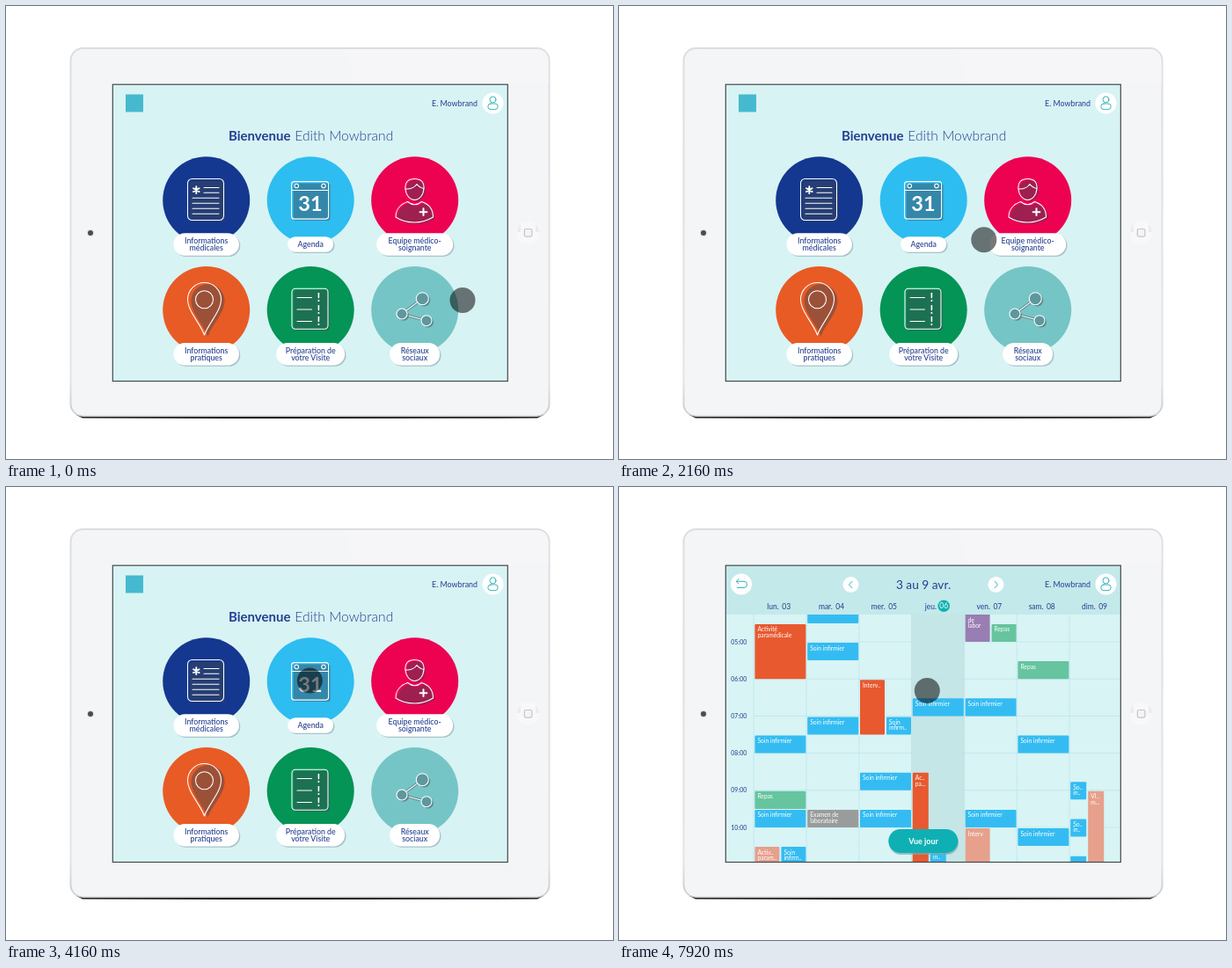
An HTML page for the animation above (8000 ms loop, 690 by 515 pixels).

```html
<!DOCTYPE html>
<html lang="fr">
<head>
<meta charset="utf-8">
<title>Tablette</title>
<style>
html, body { margin: 0; width: 100%; height: 100%; overflow: hidden; background: #fff }
svg { display: block; width: 690px; height: 515px; font-family: Lato, "Open Sans", sans-serif }
text { white-space: pre }
.navy { fill: #233f90 }
.mid { text-anchor: middle }
.line { fill: none; stroke: #fff; stroke-width: 1.05; stroke-linecap: round; stroke-linejoin: round }
.shade { fill: #3c4650; opacity: .45 }
.teal { fill: none; stroke: #35b5b9; stroke-width: 1; stroke-linecap: round; stroke-linejoin: round }
</style>
</head>
<body>
<svg viewBox="0 0 690 515">
  <defs>
    <clipPath id="screen"><rect x="121" y="89" width="450" height="338"/></clipPath>
    <clipPath id="grid"><rect x="121" y="145" width="450" height="281"/></clipPath>
    <linearGradient id="edge" x2="0" y2="1">
      <stop offset="0" stop-color="#dcdde0"/><stop offset=".9" stop-color="#e3e4e6"/><stop offset="1" stop-color="#c9cacd"/>
    </linearGradient>
  </defs>
  <path d="M80 465H611L604 468.6Q345 469.4 87 468.6Z" fill="#222224"/>
  <rect x="72.5" y="47" width="546" height="420" rx="15" fill="url(#edge)"/>
  <rect x="74.5" y="49" width="542" height="416.5" rx="13" fill="#f4f5f7"/>
  <path d="M383 49H604a12.5 12.5 0 0 1 12.5 12.5V89H398Z" fill="#f6f6f8"/>
  <circle cx="96" cy="258" r="4.2" fill="#e4e4e6"/>
  <circle cx="96" cy="258" r="3" fill="#4c4c50"/>
  <circle cx="593.5" cy="257.5" r="13" fill="#f8f8fa"/>
  <path d="M581 257a12.5 12.5 0 0 1 4-9v9ZM606 257a12.5 12.5 0 0 0-4-9v9Z" fill="#ececee"/>
  <rect x="589.3" y="253.5" width="8.6" height="8.6" rx="1.8" fill="#f4f4f5" stroke="#c3c4c7" stroke-width="1.2"/>
  <g clip-path="url(#screen)">
    <g id="home"></g>
    <g id="agenda"></g>
    <g id="user"></g>
  </g>
  <rect x="121.3" y="89.2" width="449" height="337.3" fill="none" stroke="#434a4c" stroke-width="1.2"/>
  <circle id="touch" r="14.5" fill-opacity=".53"/>
</svg>
<script>
const $ = id => document.getElementById(id);
const rect = (x, y, w, h, r, attrs) => `<rect x="${x}" y="${y}" width="${w}" height="${h}" rx="${r}" ${attrs}/>`;
const disc = (x, y, r, attrs) => `<circle cx="${x}" cy="${y}" r="${r}" ${attrs}/>`;
const path = (d, attrs = 'class="line"') => `<path d="${d}" ${attrs}/>`;
const text = (x, y, size, s, attrs = 'class="navy"') => `<text x="${x}" y="${y}" font-size="${size}" ${attrs}>${s}</text>`;
const white = 'fill="#fff"', line = 'class="line"', shade = 'class="shade"';

// An outlined shape with its fill shifted right and down
const raised = (make, dx = 2) => `<g transform="translate(${dx} 1.8)">${make(shade)}</g>` + make(line);

const person = 'M456.5 222.5Q464.5 229 472.5 222.5C480 225 485.5 231 485.5 240C479 244 472 246 464.5 246S449 244 443 240C443 231 449 225 456.5 222.5Z' +
  'M454 207.5C453.5 200 457.5 196.5 464.5 196.5S475.5 200 475 207.5C474.5 215.5 469.5 220.5 464.5 220.5S454.5 215.5 454 207.5Z';
const pin = 'M225.5 374C221 361 206.5 347 206.5 333.5a19 19 0 0 1 38 0C244.5 347 230 361 225.5 374Z';
const nodes = [[473.3, 332.7, 7], [450, 350, 6], [478, 357.7, 6]];
const links = 'M450 350L473.3 332.7M450 350L478 357.7';

const icons = [
  raised(c => rect(206.5, 196.5, 41, 47, 5, c)) +
    path('M225 206.5H242M225 212.3H242M212 218.3H242M212 224.3H242M212 230.3H242M212 236.3H242') +
    path('M216.3 205.3V213M213 207.2L219.6 211.1M219.6 207.2L213 211.1', 'class="line" style="stroke-width:1.9"'),
  raised(c => rect(324.6, 199.6, 42, 42.5, 3, c)) + path('M324.6 209.5H366.6') +
    disc(330.3, 204.5, 2.3, line) + disc(361, 204.5, 2.3, line) +
    text(346, 233.3, 23.5, '31', 'class="mid" font-weight="700" fill="#fff"'),
  raised(c => path(person, c)) + path('M454 208Q463 208.5 467 202.5Q470 206.5 475 207.5') +
    path('M474.5 230.3V238.1M470.6 234.2H478.4', 'class="line" style="stroke-width:2"'),
  raised(c => path(pin, c), 4) + disc(225.5, 333.7, 10, line),
  raised(c => rect(325, 321.3, 41, 46, 4, c)) + path('M331 331.5H347.5M331 345H347.5M331 358.5H347.5') +
    [336, 349.6, 363.1].map(y => text(355.5, y, 13.5, '!', 'class="mid" font-weight="700" fill="#fff"')).join(''),
  path(links, 'class="shade" style="stroke:#3c4650;stroke-width:3"') + path(links) +
    nodes.map(([x, y, r]) => disc(x + 2, y + 1.8, r, shade) + disc(x, y, r, 'class="line" style="fill:#5f979e"')).join('')
];

// colour, pill width, label lines
const tiles = [
  ['#14388f', 74.5, 'Informations', 'médicales'],
  ['#2dbdf1', 52, 'Agenda'],
  ['#ec0251', 87, 'Equipe médico-', 'soignante'],
  ['#e85b25', 74.5, 'Informations', 'pratiques'],
  ['#049455', 78, 'Préparation de', 'votre Visite'],
  ['#76c5c6', 57, 'Réseaux', 'sociaux']
];

function tile([color, w, ...lines], i) {
  const x = 227.7 + i % 3 * 118.5, y = i < 3 ? 220.8 : 345.6;
  const h = lines.length > 1 ? 25.5 : 17.5, cy = y + 50.2;
  const pill = (d, fill) => rect(x - w / 2 + d, cy - h / 2 + d, w, h, h / 2, `fill="${fill}"`);
  const first = cy + 3 - (lines.length - 1) * 4.2;
  return disc(x, y, 49.5, `fill="${color}"`) + icons[i] + pill(1.3, '#a9c3c8') + pill(0, '#fff') +
    lines.map((s, k) => text(x, first + k * 8.4, 8.8, s, 'class="navy mid" font-weight="500"')).join('');
}

$('home').innerHTML = rect(121, 89, 450, 338, 0, 'fill="#d8f3f4"') +
  rect(136, 100.5, 20, 20, 0, 'fill="#45b9cf"') +
  text(253, 153, 15, 'Bienvenue', 'class="navy" font-weight="700"') +
  text(328.3, 153, 15.6, 'Edith Mowbrand', 'class="navy" font-weight="300"') + tiles.map(tile).join('');

$('user').innerHTML = text(536, 114, 8.9, 'E. Mowbrand', 'class="navy" text-anchor="end"') +
  disc(553.5, 110.5, 12, white) + disc(553.5, 106.4, 3.5, 'class="teal"') +
  rect(547.8, 111, 11.4, 6.6, 3.3, 'class="teal"');

const blue = '#34bcf2', orange = '#e8592f', green = '#66c49e', salmon = '#e6a08c', care = ['Soin infirmier'];
const colX = i => 153.2 + i * 59.8, hourY = h => 176 + (h - 5) * 42.2;

// day, offset in the column, width, start hour, end hour, colour, lines
const events = [
  [0, 0, 58, 4.5, 6, orange, 'Activité', 'paramédicale'],
  [0, 0, 58, 9, 9.5, green, 'Repas'],
  [0, 0, 28, 10.5, 11.5, salmon, 'Activ..', 'param..'],
  [0, 30, 28, 10.5, 11.5, blue, 'Soin', 'infirm..'],
  [1, 0, 58, 9.5, 10, '#9a9c9c', 'Examen de', 'laboratoire'],
  [2, 0, 28, 6, 7.5, orange, 'Interv..'],
  [2, 30, 28, 7, 7.5, blue, 'Soin', 'infirm..'],
  [3, 0, 18, 8.5, 11.5, orange, 'Ac..', 'pa...'],
  [3, 20, 18, 10.62, 11.5, blue, 'in..'],
  [4, 0, 28, 4.1, 5, '#987eb3', '', 'de', 'labor'],
  [4, 30, 28, 4.5, 5, green, 'Repas'],
  [4, 0, 28, 10, 11.5, salmon, 'Interv'],
  [5, 0, 58, 5.5, 6, green, 'Repas'],
  [6, 0, 18, 8.75, 9.25, blue, 'So..', 'in..'],
  [6, 0, 18, 9.75, 10.25, blue, 'So..', 'in..'],
  [6, 0, 18, 10.75, 11.5, blue],
  [6, 20, 18, 9, 11.5, salmon, 'VI..', 'm...'],
  [1, 0, 58, 4, 4.5, blue]
];
[[0, 7.5], [0, 9.5], [1, 5], [1, 7], [2, 8.5], [2, 9.5], [3, 6.5], [4, 6.5], [4, 9.5], [5, 7.5], [5, 10]]
  .forEach(([day, h]) => events.push([day, 0, 58, h, h + .5, blue, ...care]));

function event([day, dx, w, from, to, color, ...lines]) {
  const x = colX(day) + 1.2 + dx, y = hourY(from) + 1;
  return rect(x, y, w, hourY(to) - y, 1, `fill="${color}"`) +
    lines.map((s, k) => text(x + 3, y + 8.5 + k * 6.4, 6.7, s, white)).join('');
}

let grid = rect(121, 145, 450, 282, 0, 'fill="#d8f4f5"') + rect(colX(3), 145, 59.8, 282, 0, 'fill="#c5e6e6"');
for (let h = 5; h < 11; h++)
  grid += path(`M153 ${hourY(h)}H571`, 'stroke="#bfe5ea" stroke-width=".8"') + text(127.3, hourY(h) + 2.6, 7, `0${h}:00`.slice(-5));
for (let i = 0; i < 7; i++)
  grid += path(`M${colX(i)} 145V427`, 'stroke="#a5d9e2" stroke-width=".8" stroke-dasharray="1 1"');

const names = ['lun. 03', 'mar. 04', 'mer. 05', 'jeu.', 'ven. 07', 'sam. 08', 'dim. 09'];
const days = names.map((s, i) =>
  text(i == 3 ? 354.3 : 181.7 + i * 59.8, 138.6, 8.5, s, 'class="navy mid" word-spacing="1.2"')).join('');

$('agenda').innerHTML = `<g clip-path="url(#grid)">${grid + events.map(event).join('')}</g>` +
  rect(121, 89, 450, 56, 0, 'fill="#c4e9ea"') + days +
  disc(369.2, 135.3, 6.8, 'fill="#10b0b0"') + text(369.2, 138.4, 8.5, '06', 'class="mid" fill="#fff"') +
  text(346, 115.8, 13.7, '3 au 9 avr.', 'class="navy mid"') +
  disc(139, 110.5, 12, white) + disc(263.5, 111, 9, white) + disc(428.5, 111, 9, white) +
  path('M136 104.5L133.5 107.3L136 110M133.5 107.3H142a3.6 3.6 0 0 1 0 7.2H134.5', 'class="teal"') +
  path('M265 107.2L261.5 111L265 114.8M427 107.2L430.5 111L427 114.8', 'class="teal"') +
  rect(307, 391, 79, 27, 13.5, 'fill="#7fa9ad" opacity=".7"') + rect(306.3, 389, 79, 27, 13.5, 'fill="#0fb0b3"') +
  text(346, 405.6, 9, 'Vue jour', 'class="mid" font-weight="700" fill="#fff"');

const STEP = 80, start = performance.now();
const part = (t, from, to) => Math.min(1, Math.max(0, (t - from) / (to - from)));

function draw() {
  const now = (performance.now() - start) % 8000;
  const t = Math.floor(now / STEP) * STEP;
  const glide = part(t, 960, 2960), leave = part(t, 7520, 7920);
  const tap = 1 - Math.abs(2 * part(t, 3840, 4160) - 1);
  const touch = $('touch');
  touch.setAttribute('cx', 519 - 173.7 * glide + 5 * leave);
  touch.setAttribute('cy', 334.5 - 114.5 * glide + 11.5 * leave);
  touch.setAttribute('r', 14.5 + 4 * tap);
  const open = t >= 4720;
  $('home').style.display = open ? 'none' : '';
  $('agenda').style.display = open ? '' : 'none';
  requestAnimationFrame(draw);
}
draw();
</script>
</body>
</html>
```
